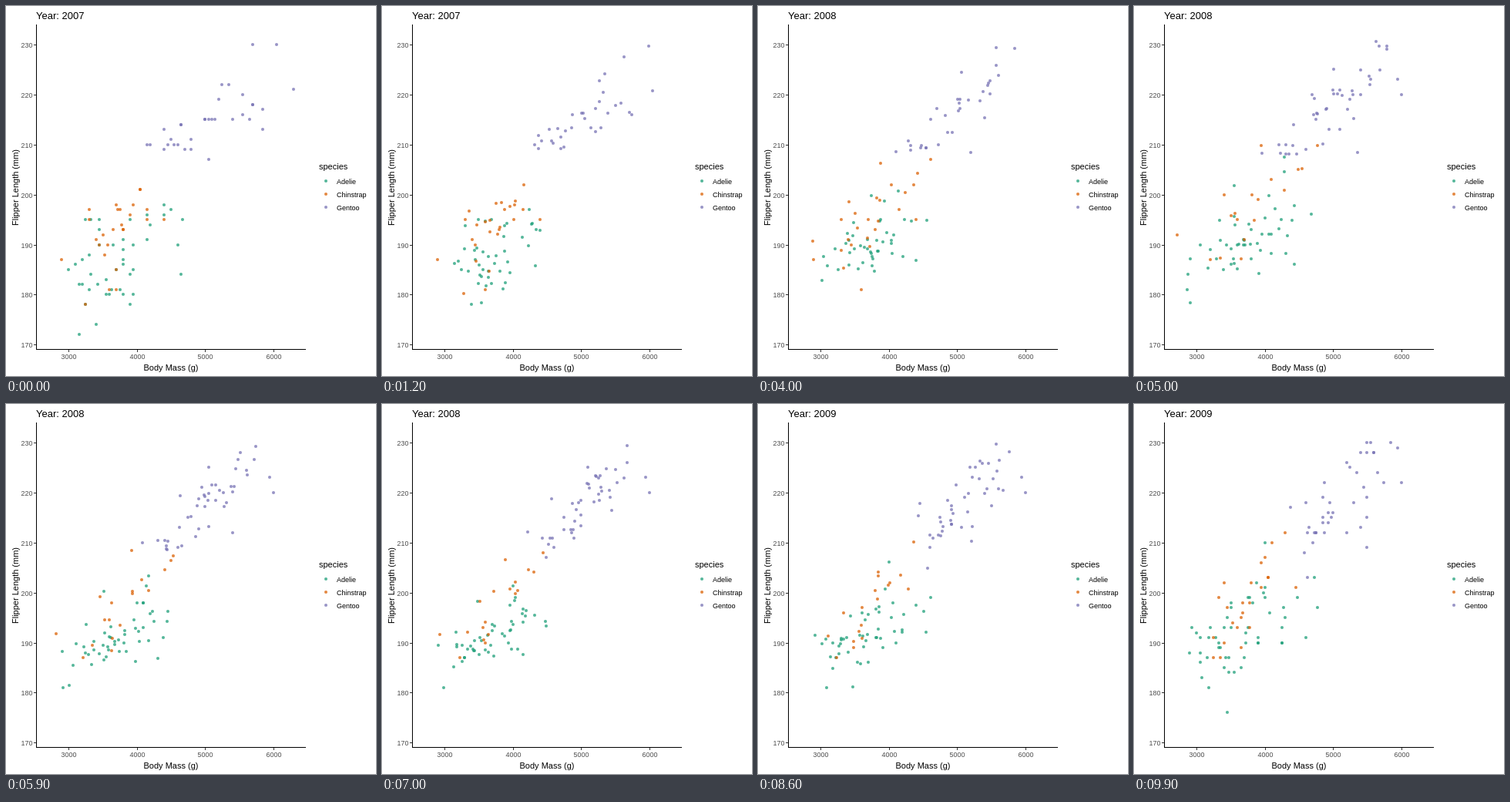
An HTML page that plays this animation: 480 by 480 pixels, repeating every 10000 ms.

```html
<!DOCTYPE html>
<html lang="en">
<head>
<meta charset="utf-8">
<title>Penguins by year</title>
<style>
  html, body { margin: 0; width: 100%; height: 100%; overflow: hidden; background: #fff; }
  svg { display: block; width: 480px; height: 480px; font-family: "Liberation Sans", Arial, sans-serif; }
</style>
</head>
<body>
<svg id="chart" viewBox="0 0 480 480" xmlns="http://www.w3.org/2000/svg"></svg>
<script>
// Each list alternates body mass (g) and flipper length (mm).
const adelie2007 = [
  3750,181, 3800,186, 3250,195, 3450,193, 3650,190, 3625,181, 4675,195, 3200,182, 3800,191, 4400,198, 3700,185,
  3450,195, 4500,197, 3325,184, 4200,194, 3400,174, 3600,180, 3800,189, 3950,185, 3800,180, 3800,187, 3550,183,
  3200,187, 3150,172, 3950,180, 3250,178, 3900,178, 3300,188, 3900,184, 3325,195, 4150,196, 3950,190, 3550,180,
  3300,181, 4650,184, 3150,182, 3900,195, 3100,186, 4400,196, 3000,185, 4600,190, 3425,182, 3450,190, 4150,191];
const adelie2008 = [
  3500,186, 4300,188, 3450,190, 4050,200, 2900,187, 3700,191, 3550,186, 3800,193, 2850,181, 3750,194, 3150,185,
  4400,195, 3600,185, 4050,192, 2850,184, 3950,192, 3350,195, 4100,188, 3050,190, 4450,198, 3600,190, 3900,190,
  3550,196, 4150,197, 3700,190, 4250,195, 3700,191, 3900,184, 3550,187, 4000,195, 3200,189, 4700,196, 3800,187,
  4200,193, 3350,191, 3550,194, 3800,190, 3500,189, 3950,189, 3600,190, 3550,202, 4300,205, 3400,185, 4450,186,
  3300,187, 4300,208, 3700,190, 4350,192, 2900,178, 4100,192];
const adelie2009 = [
  3725,192, 4725,203, 3075,183, 4250,190, 2925,193, 3550,184, 3750,199, 3900,190, 3175,181, 4775,197, 3825,198,
  4600,191, 3200,193, 4275,197, 3900,191, 4075,196, 2900,188, 3775,199, 3350,189, 3325,189, 3150,187, 3500,198,
  3450,176, 3875,202, 3050,186, 4000,199, 3275,191, 4300,195, 3050,191, 4000,210, 3325,190, 3500,197, 3500,193,
  4475,199, 3425,187, 3900,190, 3175,191, 3975,200, 3400,185, 4250,193, 3400,193, 3475,187, 3050,188, 3725,190,
  3000,192, 3650,185, 4250,190, 3475,184, 3450,195, 3750,193, 3700,187, 4000,201];

const chinstrap2007 = [
  3500,192, 3900,196, 3650,193, 3525,188, 3725,197, 3950,198, 3250,178, 3750,197, 4150,195, 3700,198, 3800,193,
  3775,194, 3700,185, 4050,201, 3575,190, 4050,201, 3300,197, 3700,181, 3450,190, 4400,195, 3600,181, 3400,191,
  2900,187, 3800,193, 3300,195, 4150,197];
const chinstrap2008 = [
  3400,200, 3800,200, 3700,191, 4550,205, 3200,187, 4300,201, 3350,187, 4100,203, 3600,195, 3900,199, 3850,195,
  4800,210, 2700,192, 4500,205, 3950,210, 3650,187, 3550,196, 3500,196];
const chinstrap2009 = [
  3675,196, 4450,201, 3400,190, 4300,212, 3250,187, 3675,198, 3325,199, 3950,201, 3600,193, 4050,203, 3350,187,
  3450,197, 3250,191, 4050,203, 3800,202, 3525,194, 3950,206, 3650,189, 3650,195, 4000,207, 3400,202, 3775,193,
  4100,210, 3775,198];

const gentoo2007 = [
  4500,211, 5700,230, 4450,210, 5700,218, 5400,215, 4550,210, 4800,211, 5200,219, 4400,209, 5150,215, 4650,214,
  5550,216, 4650,214, 5850,213, 4200,210, 5850,217, 4150,210, 6300,221, 4800,209, 5350,222, 5700,218, 5000,215,
  4400,213, 5050,215, 5000,215, 5100,215, 5650,215, 4600,210, 5550,220, 5250,222, 4700,209, 5050,207, 6050,230];
const gentoo2008 = [
  5150,220, 5400,220, 4950,213, 5250,219, 4350,208, 5350,208, 3950,208, 5700,225, 4300,210, 4750,216, 5550,222,
  4900,217, 4200,210, 5400,225, 5100,213, 5300,215, 4850,210, 5300,220, 4400,210, 5000,225, 4900,217, 5050,220,
  4300,208, 5000,220, 4450,208, 5550,224, 4200,208, 5300,221, 4400,214, 5650,231, 4700,219, 5700,230, 5800,229,
  4700,220, 5550,223, 4750,216, 5000,221, 5100,221, 5200,217, 4700,216, 5800,230, 4600,209, 6000,220, 4750,215,
  5950,223];
const gentoo2009 = [
  4625,212, 5450,221, 4725,212, 5350,224, 4750,212, 5600,228, 4600,218, 5300,218, 4875,212, 5550,230, 4950,218,
  5400,228, 4750,212, 5650,224, 4850,214, 5200,226, 4925,216, 4875,222, 4625,203, 5250,225, 4850,219, 5600,228,
  4975,215, 5500,228, 5500,215, 4700,210, 5500,219, 4575,208, 5500,209, 5000,216, 5950,229, 4650,213, 5500,230,
  4375,217, 5850,230, 6000,222, 4925,214, 4850,215, 5750,222, 5200,212, 5400,213];

const species = [
  { name: "Adelie", color: "#1b9e77", years: [adelie2007, adelie2008, adelie2009] },
  { name: "Chinstrap", color: "#d95f02", years: [chinstrap2007, chinstrap2008, chinstrap2009] },
  { name: "Gentoo", color: "#7570b3", years: [gentoo2007, gentoo2008, gentoo2009] },
];

const FRAMES = 100, FRAME_MS = 100, MIDDLE = 49, LAST = 99;
const svg = document.getElementById("chart");
const xPos = mass => Math.round(38.88 + (mass - 2520) * 0.08842);
const yPos = length => Math.round(426.3 - (length - 172) * 6.487);

function add(tag, attrs, text) {
  const node = document.createElementNS(svg.namespaceURI, tag);
  for (const key in attrs) node.setAttribute(key, attrs[key]);
  if (text) node.textContent = text;
  return svg.appendChild(node);
}
const label = (x, y, size, text, attrs) => add("text", { x, y, "font-size": size, ...attrs }, text);
const bar = (x, y, width, height, fill) => add("rect", { x, y, width, height, fill });
const dot = (cx, cy, fill) => add("circle", { cx, cy, r: 2.05, fill, "fill-opacity": 0.75 });

function drawAxes() {
  bar(39, 24, 1, 422, "#000");
  bar(39, 445, 350, 1, "#000");
  for (let mass = 3000; mass <= 6000; mass += 1000) {
    bar(xPos(mass), 446, 1, 3, "#333");
    label(xPos(mass) + 0.5, 458, 9, mass, { "text-anchor": "middle", fill: "#4d4d4d" });
  }
  for (let length = 170; length <= 230; length += 10) {
    bar(36, yPos(length), 3, 1, "#333");
    label(34.5, yPos(length) + 4, 9, length, { "text-anchor": "end", fill: "#4d4d4d" });
  }
  label(214, 473, 11, "Body Mass (g)", { "text-anchor": "middle" });
  label(0, 0, 11, "Flipper Length (mm)", { "text-anchor": "middle", transform: "translate(16 235.5) rotate(-90)" });
}

function drawLegend() {
  label(406, 212, 11, "species");
  species.forEach(({ name, color }, i) => {
    dot(415, 227 + 17 * i, color);
    label(429, 231 + 17 * i, 9, name);
  });
}

drawAxes();
drawLegend();
const title = label(39, 17, 13, "Year: 2007");
for (const group of species) {
  const most = Math.max(...group.years.map(list => list.length / 2));
  group.dots = Array.from({ length: most }, () => dot(0, 0, group.color));
}

// Unpaired points wait in place until the next year; new ones appear on arrival.
function pointAt(from, to, k, progress) {
  const i = 2 * k;
  if (i >= from.length) return null;
  const p = i < to.length ? progress : 0;
  return [from[i] + (to[i] - from[i] || 0) * p, from[i + 1] + (to[i + 1] - from[i + 1] || 0) * p];
}

function render(frame) {
  title.textContent = "Year: " + Math.round(2007 + 2 * frame / LAST);
  let step = frame < MIDDLE ? 0 : 1;
  let progress = step ? (frame - MIDDLE) / (LAST - MIDDLE) : frame / MIDDLE;
  if (frame === LAST) { step = 2; progress = 0; }
  for (const { years, dots } of species) {
    dots.forEach((node, k) => {
      const point = pointAt(years[step], years[step + 1] || [], k, progress);
      node.setAttribute("visibility", point ? "visible" : "hidden");
      if (!point) return;
      node.setAttribute("cx", xPos(point[0]));
      node.setAttribute("cy", yPos(point[1]));
    });
  }
}

const start = performance.now();
let shown = -1;
function tick() {
  const frame = Math.floor((performance.now() - start) / FRAME_MS) % FRAMES;
  if (frame !== shown) render(shown = frame);
  requestAnimationFrame(tick);
}
tick();
</script>
</body>
</html>
```
